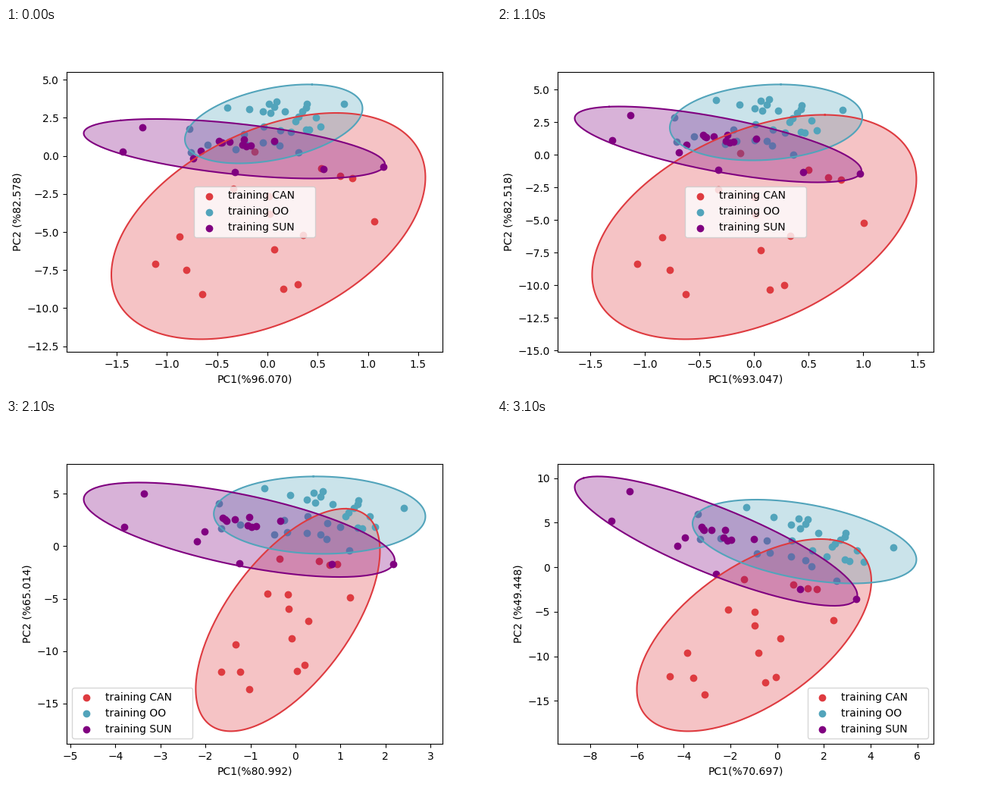
Write a matplotlib script that moves like this. It is 640 px wide and 480 px high and loops after 3.2 s.

```python
import numpy as np
import matplotlib.pyplot as plt
from matplotlib.animation import FuncAnimation

FRAMES, STEP = 32, 100
COLORS = {"CAN": "#de3b40", "OO": "#52a4bb", "SUN": "purple"}

# Key times: PC1 %, PC2 %, then one ellipse per group in data units:
# centre x, centre y, half width, half height, correlation.
KEYS = {
    0: (96.070, 82.578, .009, -4.607, 1.563, 7.43, .43,
        .062, 2.104, .884, 2.592, .39, -.33, .471, 1.499, 1.955, -.52),
    4: (98.575, 84.520, .004, -3.437, 1.229, 5.483, .45,
        .053, 1.56, .672, 1.91, .345, -.252, .406, 1.129, 1.53, -.565),
    11: (93.047, 82.518, .002, -5.537, 1.484, 8.592, .425,
         .11, 2.477, .881, 2.907, .14, -.329, .79, 1.312, 2.904, -.69),
    18: (84.885, 71.623, -.053, -6.742, 1.797, 10.429, .455,
         .359, 2.97, 1.665, 3.505, .1, -.765, 1.137, 2.267, 3.712, -.55),
    24: (77.098, 58.405, -.284, -7.329, 2.298, 10.782, .785,
         .716, 2.943, 3.039, 3.872, -.17, -1.734, 1.983, 4.646, 5.293, -.74),
    28: (75.227, 55.248, -.584, -7.659, 3.077, 10.94, .775,
         .873, 2.951, 3.645, 4.411, -.355, -1.975, 2.523, 5.291, 6.579, -.815),
    31: (70.697, 49.448, -.984, -7.634, 5.019, 10.783, .565,
         1.173, 2.872, 4.792, 4.702, -.43, -2.614, 2.919, 6.049, 7.26, -.835),
}
TRACKS = np.array(list(KEYS.values())).T

# One typical scatter, in stage pixels at time REST; it then rides its ellipse.
REST = 11
SCATTER = {
    "CAN": ([185, 218, 249, 228, 348, 360, 379, 387,
             484, 411, 437, 454, 321, 292, 340, 341],
            [311, 276, 351, 319, 293, 345, 339, 274,
             257, 187, 197, 200, 165, 213, 223, 246]),
    "OO": ([234, 237, 260, 301, 289, 320, 340, 350, 312, 316, 341,
            340, 356, 363, 391, 380, 401, 364, 406, 422, 415, 386,
            371, 390, 356, 348, 359, 396, 402, 456, 401],
           [118, 150, 143, 153, 95, 101, 106, 109, 134, 149, 127,
            148, 149, 155, 167, 138, 137, 134, 138, 135, 122, 124,
            109, 119, 101, 96, 94, 112, 102, 108, 107]),
    "SUN": ([176, 152, 240, 272, 250, 292, 274, 276,
             302, 286, 304, 307, 312, 342, 404, 479],
            [115, 148, 164, 141, 154, 187, 143, 144,
             149, 143, 141, 151, 150, 146, 190, 192]),
}


def state(t):
    """Variance shares and the three ellipses at time t."""
    row = np.array([np.interp(t, list(KEYS), track) for track in TRACKS])
    return row[:2], row[2:].reshape(3, 5)


def basis(shape):
    """Matrix that turns the unit circle into the ellipse."""
    _, _, hw, hh, rho = shape
    return np.array([[hw, 0], [rho * hh, np.sqrt(1 - rho ** 2) * hh]])


def ride(shape, unit):
    return shape[:2] + unit @ basis(shape).T


def outline(shape):
    """Closed curve that starts at the upper end of the long axis."""
    u, _, vt = np.linalg.svd(basis(shape))
    x, y = vt[0] * np.sign(u[1, 0])
    a = np.arctan2(y, x) + np.linspace(0, 2 * np.pi, 201)
    return ride(shape, np.column_stack([np.cos(a), np.sin(a)]))


def limits(shapes):
    """Lower left and upper right corner of the axes, with 5 % margins."""
    mid, half = shapes[:, :2], shapes[:, 2:4]
    low, high = (mid - half).min(axis=0), (mid + half).max(axis=0)
    pad = 0.05 * (high - low)
    return low - pad, high + pad


def legend_place(curves, low, high):
    """A lower corner that no outline crosses, else the centre."""
    x, y = ((np.concatenate(curves) - low) / (high - low)).T
    x = x[y < 0.2]
    if not np.any(x < 0.337):
        return "lower left", 0
    if not np.any(x > 0.663):
        return "lower right", 1
    return "center", 0.5


fig, ax = plt.subplots(figsize=(6.4, 4.8), dpi=100)
box = ax.get_position()
corner = np.array([640 * box.x0, 480 * box.y0])
size = np.array([640 * box.width, 480 * box.height])

units, fills, lines, dots = [], [], [], []
_, rest = state(REST)
low, high = limits(rest)
for (name, color), shape in zip(COLORS.items(), rest):
    xs, ys = SCATTER[name]
    pixels = np.column_stack([xs, 480 - np.array(ys)])
    data = low + (pixels - corner) / size * (high - low)
    units.append((data - shape[:2]) @ np.linalg.inv(basis(shape)).T)
    fills += ax.fill([0, 1, 1], [0, 0, 1], color=color, alpha=0.3, lw=0)
    dots.append(ax.scatter(*data.T, color=color, label="training " + name))
    lines += ax.plot([], [], color=color)

LEGEND_W = 173.3 / size[0]
legend = ax.legend(handles=dots, loc="center", mode="expand",
                   bbox_to_anchor=(0, 0, LEGEND_W, 1))


def draw(t):
    (pc1, pc2), shapes = state(t)
    curves = [outline(shape) for shape in shapes]
    for i, curve in enumerate(curves):
        fills[i].set_xy(curve)
        lines[i].set_data(*curve.T)
        dots[i].set_offsets(ride(shapes[i], units[i]))

    low, high = limits(shapes)
    ax.set_xlim(low[0], high[0])
    ax.set_ylim(low[1], high[1])
    ax.set_xlabel(f"PC1(%{pc1:.3f})")
    ax.set_ylabel(f"PC2 (%{pc2:.3f})")

    loc, side = legend_place(curves, low, high)
    legend.set_loc(loc)
    legend.set_bbox_to_anchor((side * (1 - LEGEND_W), 0, LEGEND_W, 1))
    return []


anim = FuncAnimation(fig, draw, frames=FRAMES, interval=STEP, repeat=True,
                     repeat_delay=0, blit=False)
plt.show()
```
